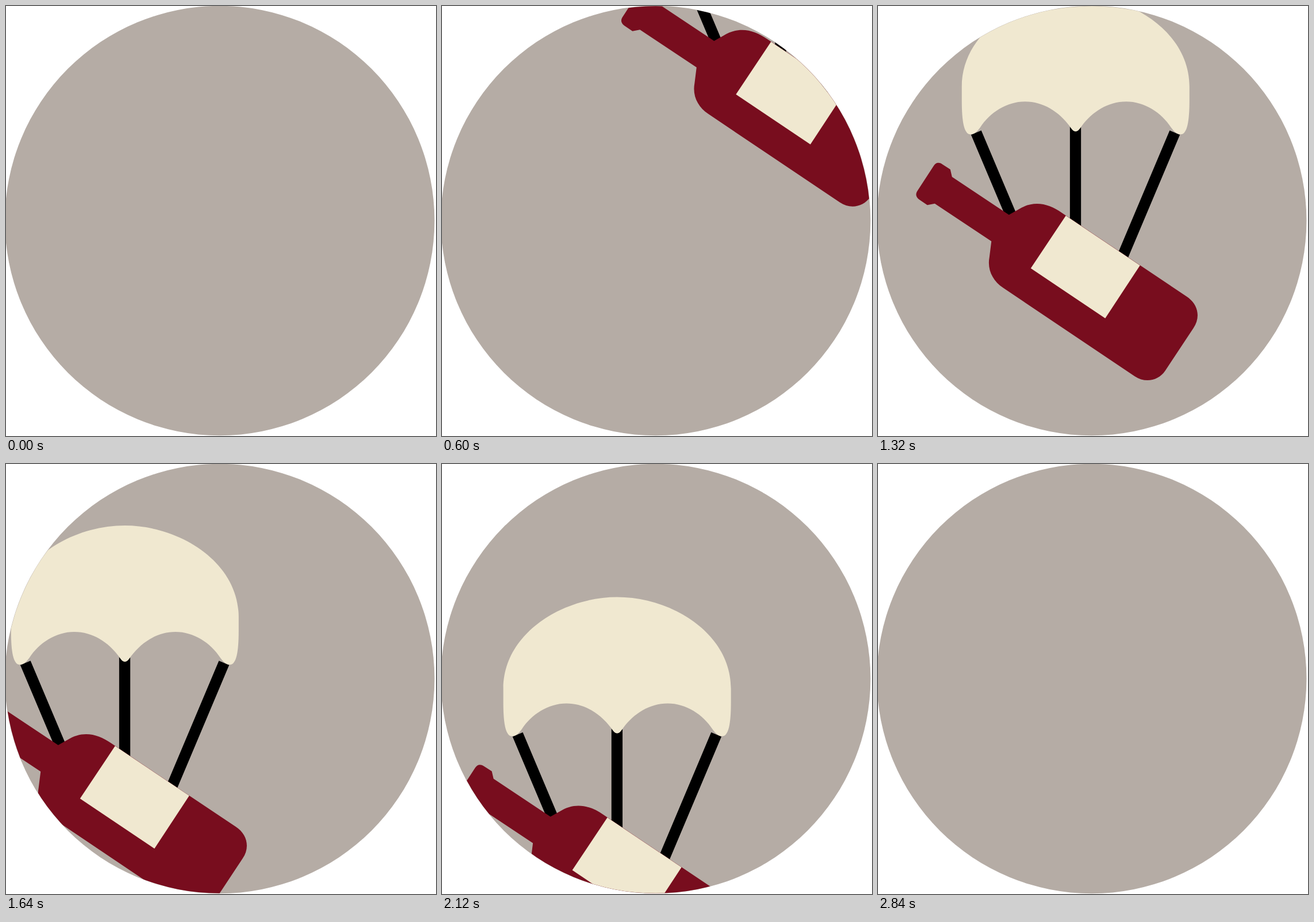
An HTML page for the animation above (3520 ms loop, 748x748 px).

```html
<!DOCTYPE html>
<html lang="en">
<head>
<meta charset="utf-8">
<title>Parachute delivery</title>
<style>
  html, body { margin: 0; width: 100%; height: 100%; overflow: hidden; background: #fff; }
  svg { display: block; width: 100%; height: 100%; }
</style>
</head>
<body>
<svg viewBox="0 0 748 748">
  <defs>
    <clipPath id="disc"><circle cx="371.7" cy="373.5" r="373.3"/></clipPath>
  </defs>
  <circle cx="371.7" cy="373.5" r="373.7" fill="#b5aca5"/>
  <g clip-path="url(#disc)">
    <g id="drop">
      <path d="M171 220L238.5 380M343.75 200V390M516.5 220L419.5 450" stroke="#000" stroke-width="19.3"/>
      <path fill="#f0e8d0" d="M344 -19C248 -19 146 45 146 140V165C146 200 150 223 161 223
        C168 223 172 219 178 211C195 185 224 166 256 166C288 166 315 184 333 208
        C337 214 340 218 344 218C348 218 351 214 355 208C373 184 400 166 432 166
        C464 166 493 185 510 211C516 219 520 223 527 223C538 223 542 200 542 165V140
        C542 45 440 -19 344 -19Z"/>
      <path fill="#780d1e" d="M112 275L126 284L129 297L228 363L244 354C270 337 297 343 320 359.5
        L537 505C557 518 562 541 549 560L500 634C488 652 465 656 447 644L218 490
        C200 478 190 459 194 437L197.5 409L99 343.5L86 346L72 336.5C66 332 65 327 69 321
        L97 278C101 272 106 271 112 275Z"/>
      <path fill="#f0e8d0" d="M327 364.5L456 451L395.5 543L266 456Z"/>
    </g>
  </g>
</svg>
<script>
  const LOOP = 3520, STEP = 40, GONE = 2840;
  const drop = document.getElementById('drop');

  // Corners of the zigzag descent
  const top0 = [-181, -655.5], right = [289.3, -265.7], left = [-166.2, 152.7], exit = [447.4, 626.2];
  const legs = [
    { start: -10, dur: 963, from: top0, to: right },
    { start: 953, dur: 995, from: right, to: left },
    { start: 1939, dur: 1130, from: left, to: exit }
  ];

  // cubic-bezier(.25, .1, .25, 1)
  function ease(x) {
    if (x <= 0) return 0;
    if (x >= 1) return 1;
    let lo = 0, hi = 1;
    for (let i = 0; i < 30; i++) {
      const s = (lo + hi) / 2;
      if (s * (0.75 + s * (s - 0.75)) < x) lo = s; else hi = s;
    }
    return lo * (0.3 + lo * (2.4 - 1.7 * lo));
  }

  function draw(ms) {
    const t = Math.floor((ms % LOOP) / STEP) * STEP;
    const hidden = t === 0 || t >= GONE;
    drop.setAttribute('visibility', hidden ? 'hidden' : 'visible');
    const leg = legs.filter(l => t >= l.start).pop();
    const p = ease((t - leg.start) / leg.dur);
    const [x, y] = leg.from.map((a, i) => a + (leg.to[i] - a) * p);
    drop.setAttribute('transform', `translate(${x.toFixed(2)} ${y.toFixed(2)})`);
  }

  let begin;
  function tick(now) {
    if (begin === undefined) begin = now;
    draw(now - begin);
    requestAnimationFrame(tick);
  }
  draw(0);
  requestAnimationFrame(tick);
</script>
</body>
</html>
```
